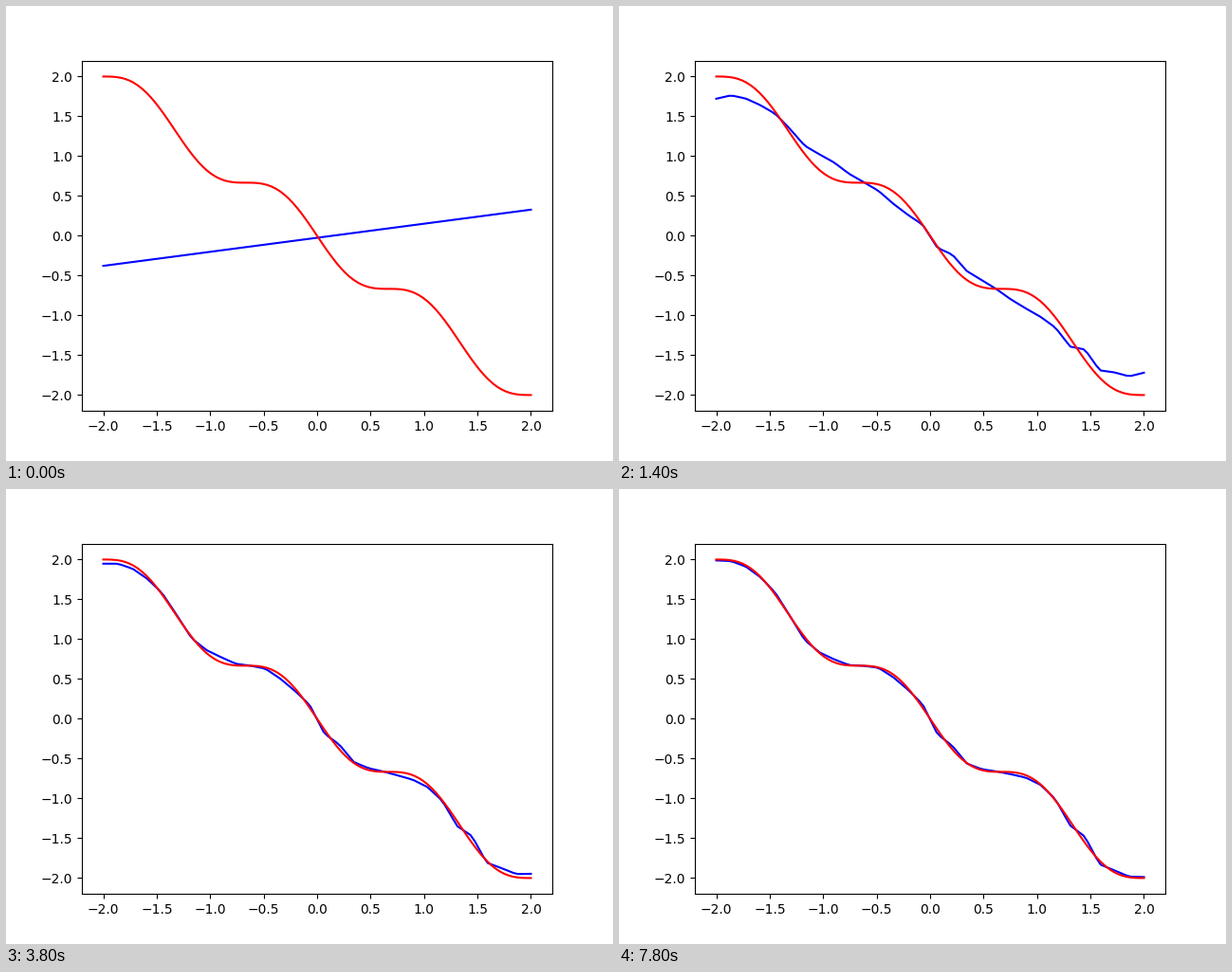
Animation, 640 px wide and 480 px high, one loop 8000 ms. Source, as a matplotlib script:

```python
import numpy as np
import matplotlib.pyplot as plt
from matplotlib.animation import FuncAnimation

FRAMES, INTERVAL = 40, 200


def target(x):
    return -x - np.sin(1.5 * np.pi * x) / (1.5 * np.pi)


def error(i):
    """Training error, falling as a power law."""
    return 2.38 * (1 + i / 5) ** -2.4


def ripple(center, height, period, width):
    """Short wave packet along the knots."""
    d = np.arange(len(knots)) - center
    return height * np.cos(2 * np.pi * d / period) * np.exp(-(d / width) ** 2)


x = np.linspace(-2, 2, 100)
knots = np.linspace(-2, 2, 30)

# Kinks that the piecewise linear model keeps to the end
kinks = (ripple(6, -0.045, 4, 3) + ripple(12, -0.032, 4, 1.5)
         + ripple(15, -0.058, 2, 1.6) + ripple(20.5, -0.03, 5, 2)
         + ripple(25, 0.075, 2, 1.6))

# Shapes the model passes through while it learns
start = 0.1765 * knots - 0.025
rough = -0.45 * np.tanh(knots) - 0.24 * knots - 0.02 + 0.4 * kinks
lag = (0.15 * np.sin(1.5 * np.pi * knots) - 0.05 * np.sin(np.pi * knots / 2)
       + 0.28 * (knots / 2) ** 9)
final = target(knots) + kinks
stages = np.array([start, rough, final + lag, final])
stage_error = np.array([error(0), error(2), error(7), 0])


def fit(i):
    pos = np.interp(-error(i), -stage_error, np.arange(len(stages)))
    j = min(int(pos), len(stages) - 2)
    values = stages[j] + (pos - j) * (stages[j + 1] - stages[j])
    return np.interp(x, knots, values)


fig, ax = plt.subplots(figsize=(6.4, 4.8), dpi=100)
line, = ax.plot(x, fit(0), color="blue")
ax.plot(x, target(x), color="red")
ax.set(xlim=(-2.2, 2.2), ylim=(-2.2, 2.2))


def update(i):
    line.set_ydata(fit(i))
    return line,


anim = FuncAnimation(fig, update, frames=FRAMES, interval=INTERVAL,
                     repeat=True, repeat_delay=0)
plt.show()
```
